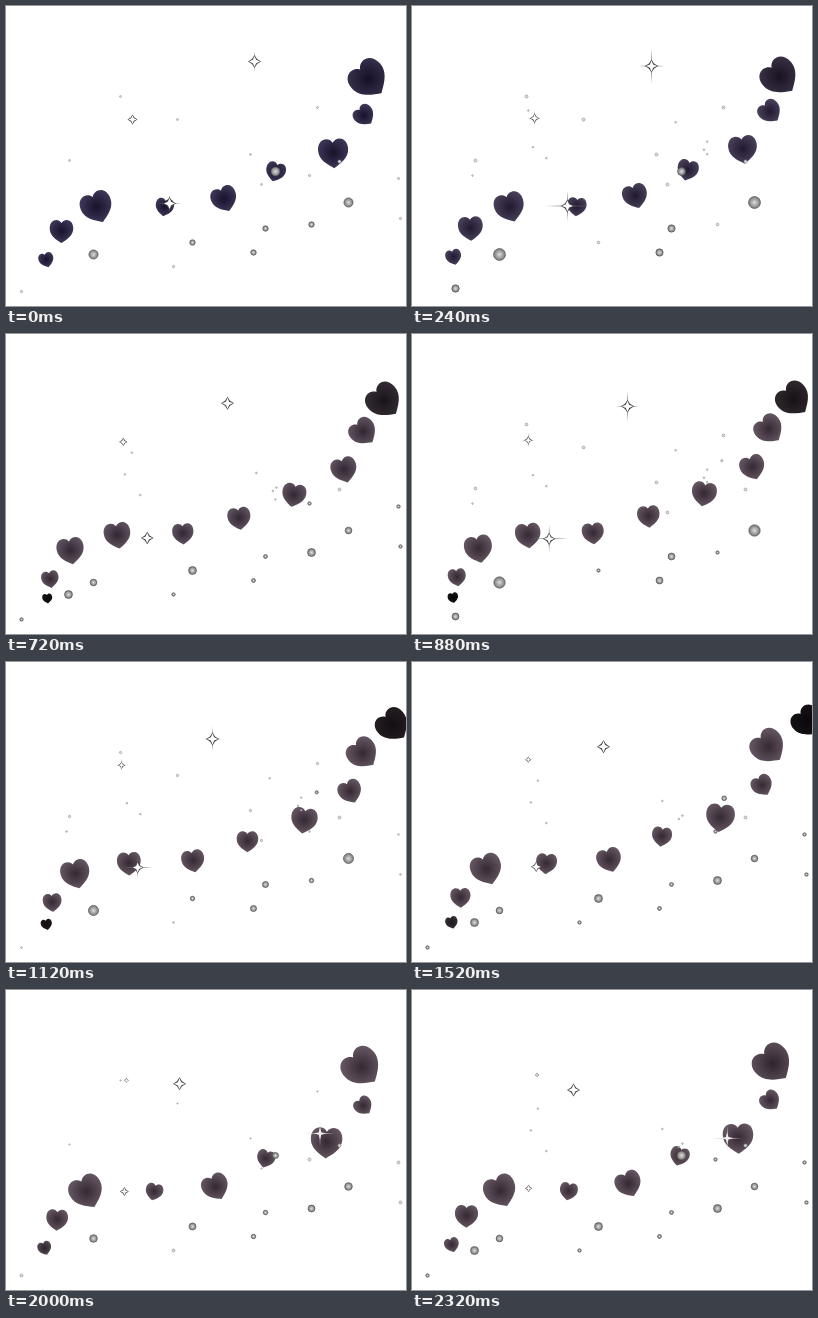
An HTML page with a canvas for the animation above (2.4 s loop, 400 by 300 pixels).

```html
<!DOCTYPE html>
<html lang="en">
<head>
<meta charset="utf-8">
<title>Hearts and sparkles</title>
<style>
html, body { margin: 0; width: 100%; height: 100%; overflow: hidden; background: #fff; }
canvas { display: block; }
</style>
</head>
<body>
<canvas id="stage" width="400" height="300"></canvas>
<script>
const ctx = document.getElementById('stage').getContext('2d');
const LOOP = 2400, STEP = 80, TURN = 2 * Math.PI;

// Each heart travels from one key point to the next: x, y, half width, tilt
const trail = [
  [43, 269, 3.5, 0], [38, 257, 7, -20], [51, 228, 11, 4], [81, 200, 17, -28],
  [150, 201, 8.5, 15], [211, 196, 13.5, -28], [261, 167, 9, 18],
  [322, 151, 16, 2], [358, 114, 9, -40], [355, 75, 19.5, -42], [407, 54, 14, -42]
];
const cool = { core: [24, 18, 44], rim: [64, 56, 88] };
const warm = { core: [52, 40, 50], rim: [102, 88, 100] };

// Bubbles that swell together: mean radius, swing, smallest visible radius, places
const bubbles = [
  [4.2, 2, 0, [[342, 196], [87, 248]]],
  [3.1, -2, 0, [[305, 218], [186, 236]]],
  [3.1, -2, 3.7, [[62, 260]]],
  [2.5, 1.3, 0, [[259, 222], [247, 246]]],
  [2.3, 1.6, 3.1, [[43, 282]]],
  [1.3, -1, 0.6, [[15, 285], [167, 260], [392, 172], [394, 212], [303, 169]]],
  [0.8, 0.8, 0.6, [[63, 154], [171, 113], [244, 148], [255, 178], [311, 101], [114, 90]]]
];

let seed = 7;
const random = () => (seed = seed * 16807 % 2147483647) / 2147483647;
const specks = Array.from({ length: 14 }, (_, i) => ({
  x: (i % 2 ? 240 : 60) + 80 * random(),
  y: 100 + 75 * random(),
  side: i % 4 < 2 ? 1 : -1
}));

const lerp = (a, b, k) => a.map((v, i) => v + (b[i] - v) * k);

function heart([x, y, r, tilt], core, rim, light) {
  const shade = rgb => `rgb(${rgb.map(v => Math.round(v * Math.max(0.2, light)))})`;
  ctx.save();
  ctx.translate(x, y);
  ctx.rotate(tilt * Math.PI / 180);
  ctx.scale(r, r);
  ctx.beginPath();
  ctx.moveTo(0, 1.04);
  ctx.bezierCurveTo(-0.4, 0.78, -1, 0.45, -1, -0.2);
  ctx.bezierCurveTo(-1, -0.98, -0.27, -1.1, 0, -0.66);
  ctx.bezierCurveTo(0.27, -1.1, 1, -0.98, 1, -0.2);
  ctx.bezierCurveTo(1, 0.45, 0.4, 0.78, 0, 1.04);
  const fill = ctx.createRadialGradient(0, 0, 0, 0, 0, 1.1);
  fill.addColorStop(0, shade(core));
  fill.addColorStop(1, shade(rim));
  ctx.fillStyle = fill;
  ctx.fill();
  ctx.restore();
}

function bubble(x, y, r) {
  if (r <= 0) return;
  const fill = ctx.createRadialGradient(x, y, 0, x, y, r);
  fill.addColorStop(0, '#ddd');
  fill.addColorStop(1, r < 1.6 ? '#ddd' : '#777');
  ctx.beginPath();
  ctx.arc(x, y, r, 0, TURN);
  ctx.fillStyle = fill;
  ctx.fill();
  ctx.strokeStyle = r < 1.6 ? '#999' : '#555';
  ctx.lineWidth = 0.7;
  ctx.stroke();
}

// Four-pointed star; waist is the distance of the inner corners
function star(x, y, w, h, waist, color) {
  ctx.beginPath();
  for (let i = 0; i < 8; i++) {
    const a = i * TURN / 8;
    const [rx, ry] = i % 2 ? [waist, waist] : [w, h];
    ctx.lineTo(x + rx * Math.cos(a), y + ry * Math.sin(a));
  }
  ctx.fillStyle = color;
  ctx.fill();
}

function sparkle(x, y, r, w, h) {
  star(x, y, Math.max(r, w), Math.max(r, h), 0.8, '#777');
  star(x, y, r, r, r * 0.55, '#444');
  star(x, y, r * 0.85, r * 0.85, r * 0.36, '#fff');
}

function draw(t) {
  const k = t / LOOP;
  const pulse = Math.cos(TURN * (3 * k - 0.22));
  const flare = pulse > 0 ? 0.45 + pulse * 0.6 : 0;

  ctx.setTransform(1, 0, 0, 1, 0, 0);
  ctx.fillStyle = '#fff';
  ctx.fillRect(0, 0, 400, 300);
  ctx.translate(0.5, 0.5);

  const u = (t + 320) % LOOP / LOOP;
  const warmth = Math.min(1, t / 800);
  const core = lerp(cool.core, warm.core, warmth);
  const rim = lerp(cool.rim, warm.rim, warmth);
  const last = trail.length - 2;
  for (let i = 0; i <= last; i++) {
    if (i === 0 && u < 0.4 || i === last && u > 0.85) continue;
    const light = i === 0 ? 1.5 * u - 0.6 : i === last ? 1 - 1.1 * u : 1;
    heart(lerp(trail[i], trail[i + 1], u), core, rim, light);
  }

  for (const [mean, swing, min, places] of bubbles) {
    const r = mean + swing * pulse;
    if (r > min) places.forEach(([x, y]) => bubble(x, y, r));
  }
  for (const { x, y, side } of specks)
    if (side * pulse > 0.35) bubble(x, y, 0.8);
  bubble(269, 165, 1.6 + 2.9 * Math.cos(TURN * k));
  bubble(333, 155, 1.5);

  sparkle(248 - 90 * k, 55 + 46 * k, 6.5, 13 * flare, 18 * flare);
  sparkle(163 - 47 * (1 - (1 - k) ** 1.8), 197 + 8 * Math.sin(Math.PI * k),
    6.5 - 3 * k * k, 22 * flare, 16 * flare);
  sparkle(115 + 11 * (2 * k - 1) ** 2, 113 - 30 * k ** 1.4, 5 - 3 * k, 7 * flare, 8 * flare);

  // A drifting speck that opens into a white sparkle over the heart
  const rise = (t - 800) / 1600;
  if (rise > 0) {
    const x = 309 + 6 * rise, y = 125 + 24 * rise;
    if (rise < 0.6) bubble(x, y, 1 + 3 * rise);
    else {
      star(x, y, 15, 13, 0.8, '#ccc');
      star(x, y, 6, 6, 1.8, '#eee');
    }
  }
}

function tick(now) {
  draw(Math.floor(now % LOOP / STEP) * STEP);
  requestAnimationFrame(tick);
}
draw(0);
requestAnimationFrame(tick);
</script>
</body>
</html>
```
